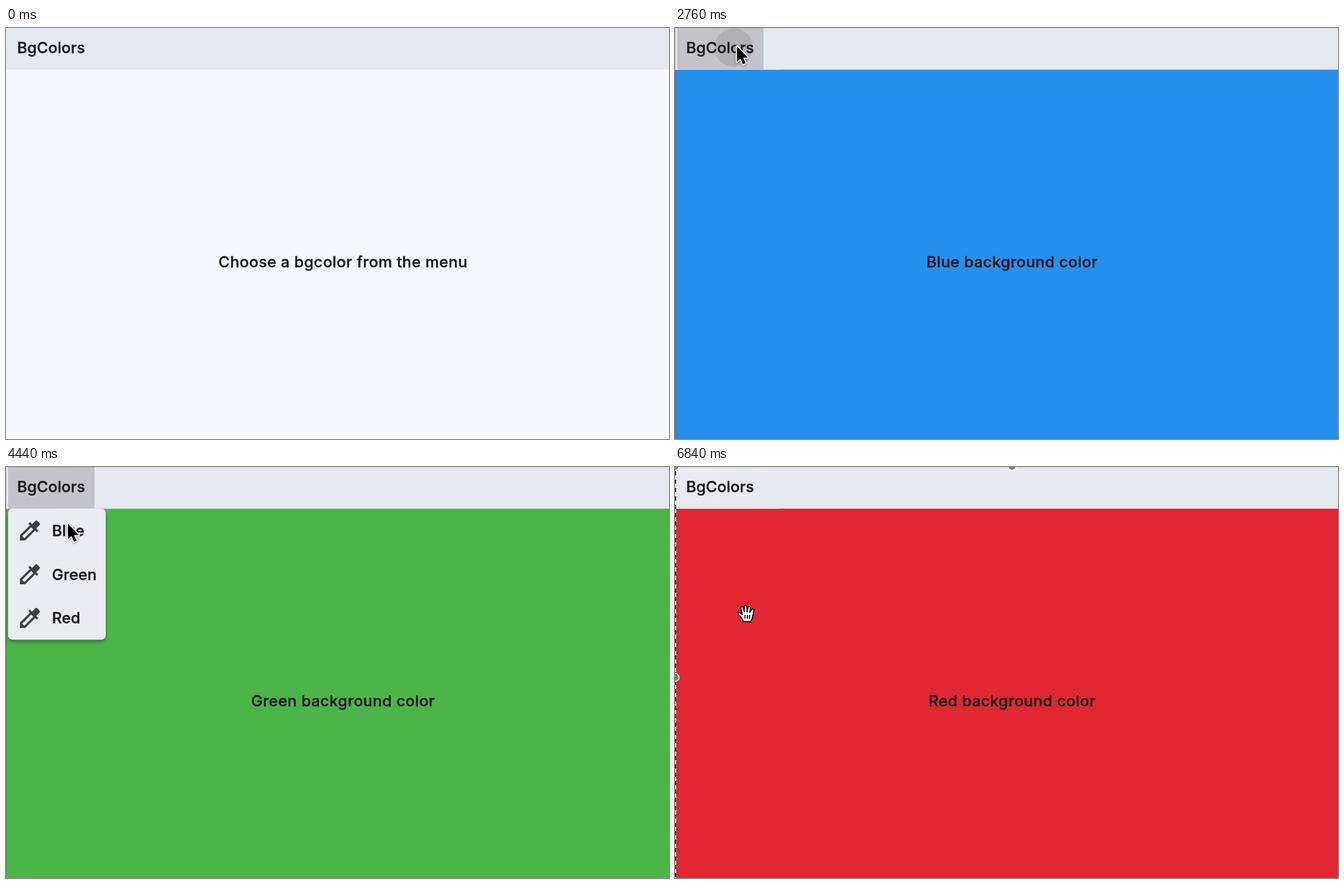
An HTML page with a canvas for the animation above (6960 ms loop, 951 px wide and 589 px high).

```html
<!DOCTYPE html>
<html lang="en">
<head>
<meta charset="utf-8">
<title>BgColors</title>
<style>
html, body { margin: 0; width: 100%; height: 100%; overflow: hidden; }
canvas { display: block; width: 951px; height: 589px; }
</style>
</head>
<body>
<canvas id="stage" width="951" height="589"></canvas>
<script>
const ctx = document.getElementById('stage').getContext('2d');
const LOOP = 6960, W = 951, H = 589, BAR = 59.7, ROW = 62.7;
const INK = '#18181b';

const items = [
  { name: 'Blue', color: '#2690ed' },
  { name: 'Green', color: '#4bb547' },
  { name: 'Red', color: '#e12731' },
];

// One visit to the menu per item: button press, menu open, item press, menu closed
const visits = [
  { press: 1080, open: 1200, pick: 1640, end: 1760 },
  { press: 2680, open: 2800, pick: 3320, end: 3480 },
  { press: 4080, open: 4200, pick: 5080, end: 5200 },
];

// Pointer path: time, x, y
const path = [
  [40, 290, 179], [360, 290, 179], [1000, 88, 25], [1340, 88, 25],
  [1560, 97, 82], [2160, 97, 82], [2440, 88, 25], [2920, 88, 25],
  [3240, 97, 140], [3520, 97, 140], [3840, 88, 25], [4400, 88, 25],
  [4440, 88, 80], [4840, 102, 207], [LOOP, 102, 207],
];
const GRAB = 6760;

const dropper = new Path2D('M20.71 5.63l-2.34-2.34a1 1 0 0 0-1.41 0l-3.12 3.12-1.93-1.91-1.41 1.41 1.42 1.42L3 16.25V21h4.75l8.92-8.92 1.42 1.42 1.41-1.41-1.92-1.92 3.12-3.12c.4-.4.4-1.03.01-1.42zM6.92 19L5 17.08l8.06-8.06 1.92 1.92z');
const arrow = new Path2D('M.8 1.2V23.5L5.9 18.8L9.4 27L13.2 25.4L9.7 17.4H16.6Z');
const hand = new Path2D('M8 24C7 19 3 17 1 13.5C0 11 3 10.5 4.5 12L6.5 14L4.5 5.5C4 2.5 7 2 8 4.5L9.5 10L9.3 3C9.3 0 12.7 0 13 3L13.4 10L14.8 4C15.5 1.5 18.4 2 18 5L17.4 11L19.7 7C21 4.8 24 6 23 9C22 13 21.5 20 18.5 24Z');
const creases = new Path2D('M10.5 14.5V20M13.8 14.5V20M17 14.5V20');

const clamp = v => Math.max(0, Math.min(1, v));
const shade = a => `rgba(15,10,15,${a})`;

function pointer(t) {
  const i = path.findIndex(k => k[0] > t);
  if (i < 1) return { x: path[0][1], y: path[0][2] };
  const [t0, x0, y0] = path[i - 1], [t1, x1, y1] = path[i];
  const u = (t - t0) / (t1 - t0), e = u * u * (3 - 2 * u);
  return { x: x0 + (x1 - x0) * e, y: y0 + (y1 - y0) * e };
}

function fill(color, x, y, w, h) {
  ctx.fillStyle = color;
  ctx.fillRect(x, y, w, h);
}

// A hairline outline makes the medium weight slightly heavier
function text(str, x, y, align = 'left', spacing = 0.1) {
  ctx.font = '500 22px Inter, sans-serif';
  ctx.letterSpacing = spacing + 'px';
  ctx.textAlign = align;
  ctx.fillStyle = ctx.strokeStyle = INK;
  ctx.lineWidth = 0.35;
  ctx.fillText(str, x, y);
  ctx.strokeText(str, x, y);
}

function circle(x, y, r, color) {
  ctx.fillStyle = color;
  ctx.beginPath();
  ctx.arc(x, y, r, 0, Math.PI * 2);
  ctx.fill();
}

function ripple(x, y, age, alpha) {
  if (age >= 0 && alpha > 0) circle(x, y, 18 + age * 0.12, shade(alpha));
}

function drawBar(t, visit, hover) {
  fill('#e6e9f0', 0, 0, W, BAR);
  if (t >= 360) {
    const tint = ctx.createLinearGradient(0, 0, 150, 0);
    tint.addColorStop(0, '#eaeaf0');
    tint.addColorStop(0.75, '#e9e9f0');
    tint.addColorStop(1, '#e6e9f0');
    fill(tint, 0, 0, 150, BAR);
  }
  const pressed = visit && t >= visit.press;
  if (hover) {
    ctx.save();
    ctx.beginPath();
    ctx.rect(3, 0, 124, BAR);
    ctx.clip();
    fill(shade(pressed ? 0.17 : 0.09), 3, 0, 124, BAR);
    if (pressed) {
      const age = t - visit.press;
      ripple(84, 28, age, 0.1 * clamp((280 - age) / 160));
    }
    ctx.restore();
  }
  text('BgColors', 16, 36);
}

function drawMenu(t, visit, row, index) {
  ctx.save();
  ctx.globalAlpha = clamp((t - visit.open + 20) / 80);
  ctx.save();
  ctx.shadowColor = 'rgba(0,0,0,.35)';
  ctx.shadowBlur = 5;
  ctx.shadowOffsetY = 3;
  ctx.fillStyle = '#ebebf2';
  ctx.beginPath();
  ctx.roundRect(3, 59.5, 140, 188, 6);
  ctx.fill();
  ctx.restore();

  items.forEach((item, i) => {
    const y = 59.3 + i * ROW;
    if (i === row) {
      const picked = i === index && t >= visit.pick;
      ctx.save();
      ctx.beginPath();
      ctx.roundRect(3, y, 140, ROW, ROW / 2);
      ctx.clip();
      fill(item.color, 3, y, 140, ROW);
      fill(shade(picked ? 0.18 : 0.08), 3, y, 140, ROW);
      if (picked) ripple(95, y + 28, t - visit.pick, 0.11);
      ctx.restore();
    }
    ctx.save();
    ctx.translate(15.2, y + 12.4);
    ctx.scale(1.6, 1.6);
    ctx.fillStyle = '#3f3f43';
    ctx.fill(dropper, 'evenodd');
    ctx.restore();
    text(item.name, 66, y + 39.5);
  });
  ctx.restore();
}

function drawArrow({ x, y }) {
  ctx.save();
  ctx.translate(x, y);
  ctx.lineJoin = 'round';
  ctx.shadowColor = 'rgba(0,0,0,.35)';
  ctx.shadowBlur = 3;
  ctx.shadowOffsetY = 1;
  ctx.strokeStyle = '#fff';
  ctx.lineWidth = 3;
  ctx.stroke(arrow);
  ctx.shadowColor = 'transparent';
  ctx.fillStyle = '#000';
  ctx.fill(arrow);
  ctx.restore();
}

function drawHand() {
  ctx.save();
  ctx.translate(90, 197.5);
  ctx.lineJoin = 'round';
  ctx.fillStyle = '#fff';
  ctx.strokeStyle = '#000';
  ctx.lineWidth = 1.5;
  ctx.fill(hand);
  ctx.stroke(hand);
  ctx.stroke(creases);
  ctx.restore();
}

function drawSelection() {
  fill('#fff', 0, 0, 1.5, H);
  for (let y = 6; y < H; y += 12) fill('#000', 0, y, 1.5, 6);
  for (const [x, y] of [[0, -1], [483.5, -1], [0, 301.5]]) {
    circle(x, y, 6.5, '#fff');
    circle(x, y, 5, '#7b7b7d');
  }
}

function draw(t) {
  const done = visits.filter(v => t >= v.end).length;
  const chosen = items[done - 1], visit = visits[done];
  const open = visit && t >= visit.open - 20;
  const late = pointer(t - 50);
  const row = Math.floor((late.y - BAR) / ROW);

  fill(chosen ? chosen.color : '#f6f8fd', 0, 0, W, H);
  drawBar(t, visit, late.x < 127 && late.y < BAR);
  text(chosen ? chosen.name + ' background color' : 'Choose a bgcolor from the menu',
    483.5, 343, 'center', 0.41);
  if (t >= 360) {
    fill('rgba(0,0,0,.08)', 0, 0, W, 1);
    fill('rgba(0,0,0,.16)', 0, 0, 1, H);
  }
  if (open) drawMenu(t, visit, row, done);
  if (t >= GRAB) {
    drawSelection();
    drawHand();
  } else if (t >= 40) {
    drawArrow(pointer(t));
  }
}

function tick() {
  draw(performance.now() % LOOP);
  requestAnimationFrame(tick);
}
tick();
</script>
</body>
</html>
```
